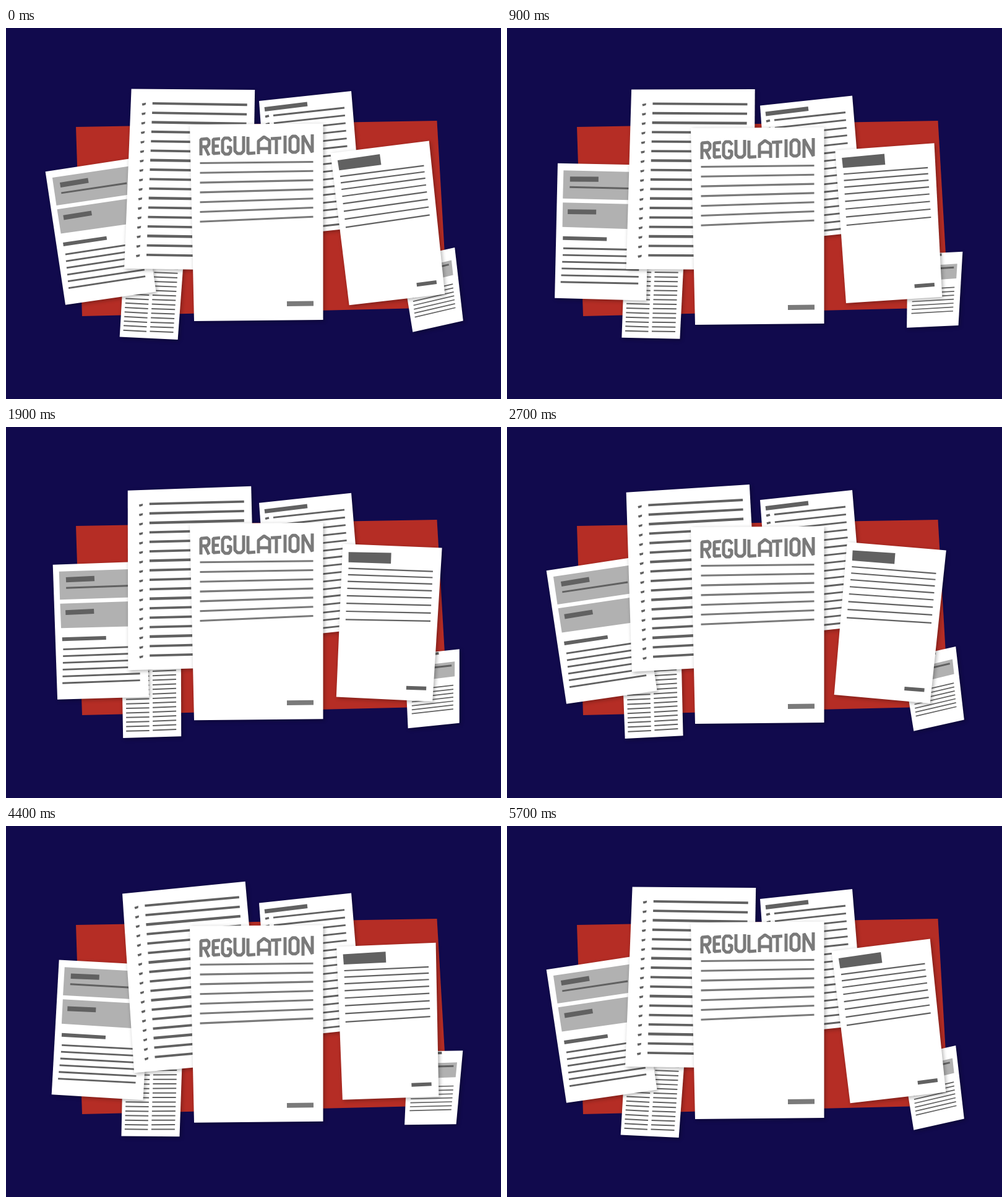
An HTML page with a canvas for the animation above (5770 ms loop, 800 px wide and 600 px high).

```html
<!DOCTYPE html>
<html lang="en">
<head>
<meta charset="utf-8">
<title>Regulation</title>
<style>
html, body { margin: 0; width: 100%; height: 100%; overflow: hidden; background: #110a4d; }
canvas { display: block; width: 800px; height: 600px; }
</style>
</head>
<body>
<canvas id="stage" width="800" height="600" role="img" aria-label="REGULATION"></canvas>
<script>
const ctx = document.getElementById('stage').getContext('2d');
const LOOP = 5770, STEP = 100, END = 5700;
const NAVY = '#110a4d', RED = '#b52d25', DARK = '#616161', MID = '#7a7a7a', PALE = '#b1b1b1';

// Eases between 0 and 1, turning back at each given time and resting at END
function swing(t, ...turns) {
  const times = [0, ...turns, END];
  const i = Math.max(1, times.findIndex(x => x > t));
  if (t >= END) return 0;
  const s = (t - times[i - 1]) / (times[i] - times[i - 1]);
  const rise = (1 - Math.cos(Math.PI * s)) / 2;
  return i % 2 ? rise : 1 - rise;
}

function poly(color, ...p) {
  ctx.fillStyle = color;
  ctx.beginPath();
  for (let i = 0; i < p.length; i += 2) ctx.lineTo(p[i], p[i + 1]);
  ctx.closePath();
  ctx.fill();
}

function sheet(...p) {
  ctx.save();
  ctx.shadowColor = 'rgba(0,0,0,.32)';
  ctx.shadowBlur = 6;
  ctx.shadowOffsetX = 2;
  ctx.shadowOffsetY = 2;
  poly('#fff', ...p);
  ctx.restore();
}

function rule(x1, y1, x2, y2, w, color = DARK) {
  ctx.strokeStyle = color;
  ctx.lineWidth = w;
  ctx.beginPath();
  ctx.moveTo(x1, y1);
  ctx.lineTo(x2, y2);
  ctx.stroke();
}

function rows(n, top, gap, draw) {
  for (let i = 0; i < n; i++) draw(top + gap * i, i);
}

function turned(deg, x, y, draw) {
  ctx.save();
  ctx.translate(x, y);
  ctx.rotate(deg * Math.PI / 180);
  ctx.translate(-x, -y);
  draw();
  ctx.restore();
}

function shifted(dy, draw) {
  ctx.save();
  ctx.translate(0, dy);
  draw();
  ctx.restore();
}

function columns() {
  sheet(187, 362, 283, 358, 283, 500.5, 189, 503);
  rows(16, 381.2, 7.35, y => {
    rule(194, y + .3, 231.5, y - .5, 2);
    rule(237, y - 1, 275, y - 2.4, 2);
  });
}

function note() {
  sheet(644, 369, 732.5, 359, 733, 478.5, 650, 487.5);
  rule(660, 371, 699, 366, 4);
  poly(PALE, 655, 388, 725, 379, 725, 403, 656, 412);
  rule(662, 392.5, 720, 385.5, 3);
  rows(7, 417.5, 6.4, y => rule(656, y + 8, 723, y, 1.7));
}

function backList() {
  sheet(409, 118, 558, 102, 576, 322, 425, 338);
  rule(418, 131.5, 487, 123, 7);
  rows(16, 129, 12.4, (y, i) => {
    const x = i * .9;
    rule(432 + x, y + 12.5, 547 + x, y, 2.8);
    rule(419 + x, y + 14.5, 425 + x, y + 13, 3.5);
  });
}

function form() {
  sheet(81.5, 219, 230, 221.5, 225.5, 440.5, 77.5, 437);
  poly(PALE, 91, 230.5, 220, 233, 219, 278.5, 90, 276);
  poly(PALE, 90, 282.5, 219, 285, 218, 325.5, 89.5, 322);
  rule(101.5, 244.5, 147.5, 244.7, 8.3);
  rule(101, 257.5, 208, 259.5, 3);
  rule(98, 297.3, 144, 297.6, 7.8);
  rule(90.3, 340, 161.3, 341.5, 6);
  rows(6, 356.5, 10.9, (y, i) => rule(91 - i * .8, y, 215 - i * .5, y + 2, 2.8));
}

function bigList() {
  sheet(197, 102.5, 396.5, 96, 403, 388, 197, 393);
  rows(17, 124.3, 15.33, (y, i) => {
    rule(232, y, 385, y - 3.6, i % 4 === 2 ? 4.4 : 3.8);
    poly(DARK, 215, y + 1, 221.5, y - .5, 221, y + 3, 216, y + 4.5);
  });
}

function letter() {
  sheet(543.5, 189.5, 704, 195, 690, 443.5, 534.5, 437);
  poly(DARK, 553, 202.5, 622, 203.5, 621.5, 221, 553, 219);
  rows(8, 229, 10, (y, i) => {
    const left = y + .26 * i * i;
    rule(553 - i * .6, left, 689.5 - i * .5, left + 4.2 - i * .35, 2.2);
  });
  rule(647.5, 421.5, 679.8, 422.5, 6);
}

// Hand-cut capitals, one stroke path each
const glyphs = [
  'M315 206V180L325 179L328 182V188L325 192H317M321 192L328 206',
  'M346 179L335 180V203L346 202M335 191H344',
  'M364 183L360 178H353L350 182V200L354 204H360L363 200V193H357',
  'M370 175V199L374 203H380L384 199V175',
  'M391 176V203L403 202',
  'M408 204V183L417 176L426 182V204M408 195H426',
  'M428 179L445 178M437 178V204',
  'M451 174V203',
  'M459 179L463 175H468L472 179V198L468 201H463L459 198Z',
  'M480 204V174L495 201V172'
].map(d => new Path2D(d));

function cover() {
  sheet(297, 156, 512.5, 154.5, 512.5, 472, 304, 474);
  ctx.strokeStyle = MID;
  ctx.lineJoin = 'bevel';
  ctx.lineWidth = 5;
  glyphs.forEach(g => ctx.stroke(g));
  rows(7, 218.5, 15.8, (y, i) => rule(313.5, y, 496.5, y - 2 - i, 3.1, MID));
  rule(454, 446, 497, 445.5, 7.8, MID);
}

function paint(t) {
  const rock = 11.7 * swing(t, 1220, 2700, 4400);
  const sway = swing(t, 2720);
  const lean = 6.05 * swing(t, 4400);
  const drop = 8.8 * swing(t, 1200, 2700, 3750);
  const bob = 6 * swing(t, 900, 1800, 2700, 3600, 4500);

  ctx.fillStyle = NAVY;
  ctx.fillRect(0, 0, 800, 600);
  poly(RED, 113, 160, 696.5, 150, 714, 452, 123, 466);
  turned(4.2 - 5.5 * sway, 233.5, 429, columns);
  turned(rock - 6.3, 691.5, 423, note);
  shifted(drop, backList);
  turned(rock - 9.6, 151, 332, form);
  turned(2.27 - lean, 298, 242, bigList);
  turned(11.9 * sway - 9.1, 616, 316, letter);
  shifted(bob, cover);
}

const start = performance.now();
function tick() {
  const t = (performance.now() - start) % LOOP;
  paint(Math.floor(t / STEP) * STEP);
  requestAnimationFrame(tick);
}
tick();
</script>
</body>
</html>
```
